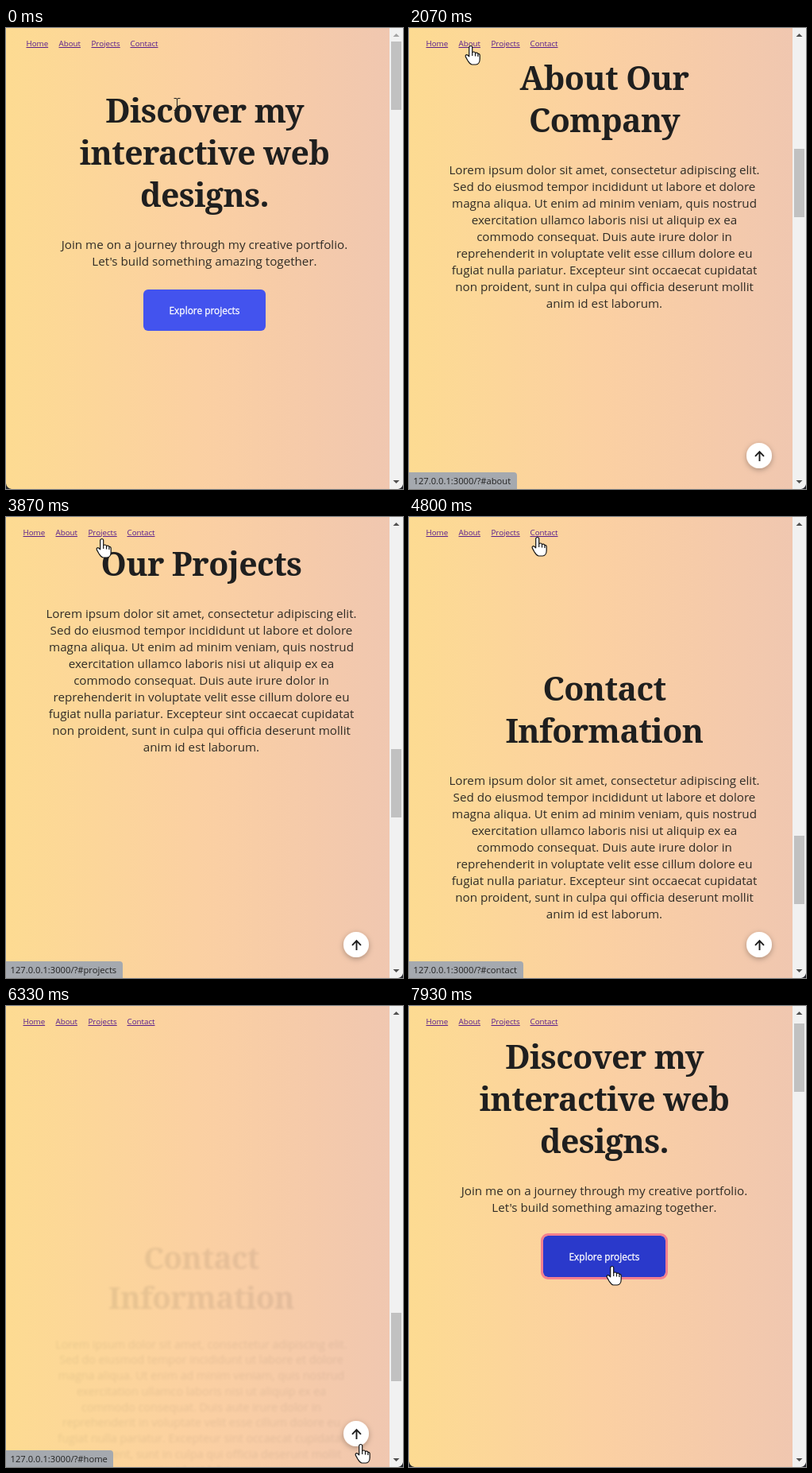
An HTML page for the animation above (8 s loop, 500x580 px).

```html
<!DOCTYPE html>
<html lang="en">
<head>
<meta charset="utf-8">
<title>Smooth scrolling portfolio</title>
<style>
  html, body { margin: 0; width: 100%; height: 100%; overflow: hidden; }
  svg { display: block; width: 500px; height: 580px; }
  text { font-family: "Open Sans", "Noto Sans", sans-serif; fill: #302c26; }
  .title { font: 700 41px "Noto Serif", serif; letter-spacing: -.6px; fill: #1f1f1f; }
  .copy { font-size: 15.2px; }
  .title, .copy, .label { text-anchor: middle; }
  .label { font-size: 11.9px; fill: #fff; stroke: #fff; stroke-width: .3px; }
  .link { font-size: 9.75px; fill: #551a8b; text-decoration: underline; }
  .url { font-size: 11.2px; fill: #222; }
</style>
</head>
<body>
<svg id="stage" viewBox="0 0 500 580">
  <defs>
    <linearGradient id="sky">
      <stop offset="0" stop-color="#fddb92"/>
      <stop offset=".5" stop-color="#fbd0a2"/>
      <stop offset=".8" stop-color="#f5caaa"/>
      <stop offset="1" stop-color="#f0c7b0"/>
    </linearGradient>
    <filter id="shade" x="-50%" y="-50%" width="200%" height="200%">
      <feDropShadow dx="0" dy="2" stdDeviation="3.5" flood-color="#000" flood-opacity=".3"/>
    </filter>
  </defs>
  <rect width="483" height="580" fill="url(#sky)"/>
  <g id="page"></g>
  <g id="nav"></g>
  <g id="up">
    <circle cx="441" cy="538" r="16" fill="#fff" filter="url(#shade)"/>
    <path d="M441.5 545V533M436 538.8l5.5-5.6 5.5 5.6" fill="none" stroke="#1c1c1c" stroke-width="1.9"/>
  </g>
  <rect x="483" width="17" height="580" fill="#f1f1f1"/>
  <rect id="thumb" x="485" width="13" height="86" fill="#c1c1c1"/>
  <path id="arrowUp" d="M487.5 11l4-4 4 4z"/>
  <path d="M487.5 569l4 4 4-4z" fill="#505050"/>
  <path d="M0 573v7h7Q1 579 0 573zM500 574v6h-6Q499 579 500 574z" fill="#25262c"/>
  <g id="status">
    <path id="bar" fill="#a5a9af"/>
    <text id="url" class="url" x="5.5" y="574"></text>
  </g>
  <g id="cursor">
    <path id="hand" fill="#fff" stroke="#111" stroke-width="1.2" stroke-linejoin="round"
      d="M-2.3 2.5a2 2 0 0 1 4 0V9c1-1.5 3.3-1.3 3.8.6 1.2-1 3-.6 3.4 1 1.3-.5 2.3.3 2.3 2V17c0 4-2 7-5 7H1.5C-1 24-2 22-4 19L-6.6 14.4c-1-2 1-3.6 2.6-2.2l1.7 1.6zM1.7 9v4M5.5 10v3.5M8.9 11v3"/>
    <path id="beam" fill="none" stroke="#222" d="M-3.5-7.5h2.5q1.5 0 1.5 1.5V6q0 1.5-1.5 1.5h-2.5M4.5-7.5H2Q.5-7.5.5-6V6Q.5 7.5 2 7.5h2.5"/>
    <path id="arrow" fill="#fff" stroke="#111" d="M0 0v16l3.7-3.5 2.6 6 2.5-1-2.6-6h5.2z"/>
  </g>
</svg>
<script>
const LOOP = 8000, TOP = [0, 921, 1858, 2753], HOME = 38;
const $ = id => document.getElementById(id);
const clamp = v => Math.max(0, Math.min(1, v));

function add(parent, tag, attrs, text) {
  const el = document.createElementNS("http://www.w3.org/2000/svg", tag);
  for (const k in attrs) el.setAttribute(k, attrs[k]);
  if (text) el.textContent = text;
  return parent.appendChild(el);
}

const lorem = [
  "Lorem ipsum dolor sit amet, consectetur adipiscing elit.",
  "Sed do eiusmod tempor incididunt ut labore et dolore",
  "magna aliqua. Ut enim ad minim veniam, quis nostrud",
  "exercitation ullamco laboris nisi ut aliquip ex ea",
  "commodo consequat. Duis aute irure dolor in",
  "reprehenderit in voluptate velit esse cillum dolore eu",
  "fugiat nulla pariatur. Excepteur sint occaecat cupidatat",
  "non proident, sunt in culpa qui officia deserunt mollit",
  "anim id est laborum."
];
const intro = [
  "Join me on a journey through my creative portfolio.",
  "Let's build something amazing together."
];

function section(heads, copy, y) {
  const g = add($("page"), "g", {});
  heads.forEach((s, i) => add(g, "text", { class: "title", x: 250, y: y + i * 53 }, s));
  const base = y + heads.length * 53;
  copy.forEach((s, i) => add(g, "text", { class: "copy", x: 250, y: base + i * 21 }, s));
  return g;
}

const sections = [
  section(["Discover my", "interactive web", "designs."], intro, 119),
  section(["About Our", "Company"], lorem, 74),
  section(["Our Projects"], lorem, 74),
  section(["Contact", "Information"], lorem, 74)
];
const button = add(sections[0], "rect", { x: 173, y: 329, width: 154, height: 52, rx: 6 });
const ring = add(sections[0], "rect", { x: 171.5, y: 327.5, width: 157, height: 55, rx: 7.5,
  fill: "none", stroke: "#f37f8f", "stroke-width": 3 });
add(sections[0], "text", { class: "label", x: 250, y: 360 }, "Explore projects");

const links = [["Home", 25.5, 53], ["About", 66.5, 95], ["Projects", 107.5, 144], ["Contact", 156.5, 192]];
for (const [s, x] of links) add($("nav"), "text", { class: "link", x, y: 23 }, s);

// cubic-bezier(.42, 0, .58, 1)
function ease(x) {
  let a = 0, b = 1;
  for (let i = 0; i < 24; i++) {
    const s = (a + b) / 2, r = 1 - s;
    if (1.26 * r * r * s + 1.74 * r * s * s + s * s * s < x) a = s; else b = s;
  }
  return a * a * (3 - 2 * a);
}

// start time and destination of each smooth scroll
const jumps = [[1588, TOP[1]], [2760, TOP[2]], [4447, TOP[3]], [6144, HOME], [7916, TOP[2]]];
function scrollAt(t) {
  let y = 0;
  for (const [start, to] of jumps) {
    if (t < start) break;
    const span = Math.sqrt(Math.abs(to - y)) * 1000 / 60;
    y += (to - y) * ease(clamp((t - start) / span));
  }
  return Math.round(y);
}

const route = [
  [330, 215, 96], [720, 244, 324], [1130, 82, 50], [1450, 78, 22], [2400, 78, 22],
  [2700, 111, 20], [2930, 111, 20], [3200, 121, 27], [3870, 121, 27], [4200, 162, 25],
  [4960, 162, 25], [5270, 300, 193], [6000, 447, 551], [6600, 447, 551],
  [7050, 327, 470], [7600, 256, 327]
];
function pointerAt(t) {
  const i = route.findIndex(k => k[0] > t);
  if (i === 0) return route[0].slice(1);
  if (i < 0) return route[route.length - 1].slice(1);
  const [t0, x0, y0] = route[i - 1], [t1, x1, y1] = route[i];
  const u = (t - t0) / (t1 - t0), e = u * u * (3 - 2 * u);
  return [x0 + (x1 - x0) * e, y0 + (y1 - y0) * e];
}

// time, url fragment, bar width
const hints = [[0, "", 0], [1430, "about", 136], [2540, "projects", 147], [4030, "contact", 144],
  [5480, "", 0], [5960, "home", 135], [7170, "", 0]];

const show = (el, on) => el.setAttribute("visibility", on ? "visible" : "hidden");
const move = (el, x, y) => el.setAttribute("transform", `translate(${x} ${y})`);

function draw(t) {
  const scroll = scrollAt(t), dx = t > 1690 ? -4 : 0;

  // sections fade, sharpen and grow as they rise into view
  sections.forEach((g, i) => {
    const top = TOP[i] - scroll, p = clamp((267 - top) / 105), k = .934 + .066 * p;
    g.setAttribute("transform", `translate(${250 + dx} ${top + 59}) scale(${k}) translate(-250 -59)`);
    g.setAttribute("opacity", p);
    g.style.filter = p < 1 && p > 0 ? `blur(${1.6 * (1 - p)}px)` : "none";
    show(g, p > 0 && top > -700);
  });
  move($("nav"), dx, 0);
  $("up").setAttribute("opacity", clamp((scroll - 100) / 100));
  $("thumb").setAttribute("y", Math.floor(17 + scroll * 460 / 3102));
  $("arrowUp").setAttribute("fill", scroll ? "#505050" : "#a3a3a3");

  const [, hash, w] = hints.filter(h => h[0] <= t).pop();
  show($("status"), w);
  $("bar").setAttribute("d", `M0 559H${w - 4}q4 0 4 4V580H0z`);
  $("url").textContent = "127.0.0.1:3000/?#" + hash;

  const [x, y] = pointerAt(t), px = x - dx, py = y + scroll;
  const onButton = px > 173 && px < 327 && py > 329 && py < 381;
  const onLink = y > 11 && y < 29 && links.some(l => px >= l[1] && px <= l[2]);
  const onUp = scroll > 100 && Math.hypot(x - 441, y - 538) < 17;
  const onText = scroll < 200 ? px > 65 && px < 435 && py > 80 && py < 305
    : x > 50 && x < 442 && y > 40 && y < 350;
  const kind = onButton || onLink || onUp ? "hand" : onText ? "beam" : "arrow";
  for (const id of ["hand", "beam", "arrow"]) show($(id), id === kind);
  move($("cursor"), Math.round(x), Math.round(y));
  button.setAttribute("fill", onButton ? "#2a39cb" : "#4353ee");
  ring.setAttribute("stroke-opacity", onButton ? 1 : 0);
}

const begin = performance.now();
function tick() {
  draw((performance.now() - begin) % LOOP);
  requestAnimationFrame(tick);
}
tick();
</script>
</body>
</html>
```
